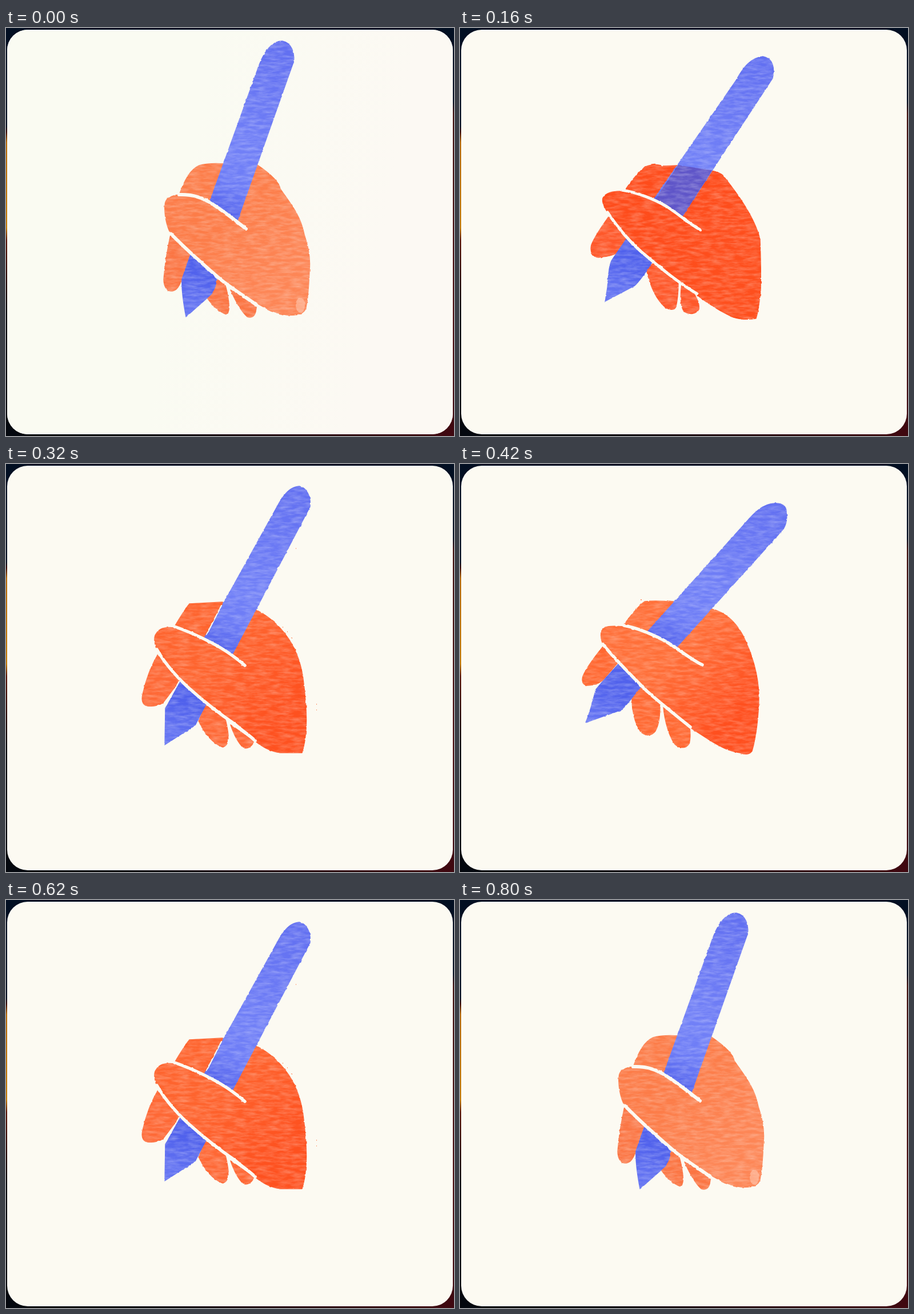
These frames come from a looping animation (784x715 px, 0.82 s). An HTML page:

```html
<!DOCTYPE html>
<html lang="en">
<head>
<meta charset="utf-8">
<title>Hand with pen</title>
<style>
  html, body { margin: 0; width: 100%; height: 100%; overflow: hidden; }
  body {
    position: relative;
    background:
      linear-gradient(#020f22 24%, #3a0805 25.5%, #b86a08 28%, #c47a06 49%, #5a1408 52%, #1c0406 64%, #04060c 70%) 0 0 / 3px 100% no-repeat,
      linear-gradient(#020f22 18%, #40100f 21%, #4a0e12 70%, #3c0810) 100% 0 / 3px 100% no-repeat,
      linear-gradient(90deg, #04080f 25%, #230812 60%, #400810) 0 100% / 100% 50% no-repeat,
      #020f22;
  }
  .card {
    position: absolute; left: 2px; top: 2.5px; width: 780px; height: 709.5px;
    border-radius: 36px; background: #fcfaf2; overflow: hidden;
  }
  .tint {
    position: absolute; inset: 0; opacity: 0;
    background: linear-gradient(100deg, #fafbf2 40%, #fcf9f3 80%);
    animation: tint 820ms linear infinite;
  }
  .strip {
    position: absolute; left: -2px; top: -2.5px; display: flex;
    animation: poses 820ms step-end infinite;
  }
  .strip svg { flex: none; display: block; }
  @keyframes tint { 0% { opacity: 1; } 14%, 100% { opacity: 0; } }
  /* four drawings in turn, held about 67 ms each */
  @keyframes poses {
    0%, 27.3%, 60.2%, 93.2%, 100% { transform: translateX(0); }
    2.6%, 35.6%, 68.5% { transform: translateX(-784px); }
    11%, 43.8%, 76.7% { transform: translateX(-1568px); }
    19%, 52%, 84.9% { transform: translateX(-2352px); }
  }
</style>
</head>
<body>
<div class="card">
  <div class="tint"></div>
  <div class="strip"></div>
</div>
<script>
const PAPER = '#fcfaf2';

// up and low are the pale lines along the thumb; tip joins them on the left
const poses = [
  {
    hand: ['#fc7c48', '#fd8656'], finger: '#fb7543', line: 6,
    back: 'M304 290C312 268 322 248 338 241C350 237 370 237 385 238L440 240C462 255 478 270 480 282C500 310 516 330 522 362C530 385 533 405 531 425C530 450 528 480 524 493C520 502 508 504 492 503C470 500 452 490 438 482Z',
    up: 'M303 292C325 291 345 297 362 309C385 324 400 336 420 352',
    low: 'M438 485C420 472 396 457 376 441C347 416 312 385 288 360',
    tip: 'C280 345 277 325 278 310C279 300 284 295 303 292Z',
    fingers: 'M288 362C283 385 278 415 276 440C276 455 283 462 291 461C299 460 303 452 307 443L322 396Z M372 438L352 473C362 487 375 498 386 502C391 499 391 485 389 475C388 465 386 458 383 448Z M393 459C400 475 410 495 422 506C430 509 435 505 437 497L439 485Z',
    pen: 'M443 65C455 32 472 22 484 23C500 26 506 45 503 60L368 442C368 455 360 466 350 475L315 506C311 485 307 460 308 440L322 400Z',
    extra: '<ellipse cx="515" cy="486" rx="8" ry="13" fill="#ffc4aa" opacity=".6"/>'
  },
  {
    hand: ['#fe642e', '#fe511f'], finger: '#fe6835', line: 5.5,
    back: 'M296 283C305 268 313 255 321 245L378 242L438 256C462 268 480 285 495 307C510 330 518 355 521 385C524 410 527 440 525 465C524 480 521 497 518 506L480 506C460 503 448 495 435 485Z',
    up: 'M295 285C330 297 365 315 385 328C400 338 410 346 418 353',
    low: 'M436 485C427 476 414 468 402 457C377 440 347 417 317 390C297 371 277 348 264 325',
    tip: 'C259 312 258 303 263 297C268 289 276 285 295 287Z',
    fingers: 'M266 333C255 352 245 378 240 400C236 414 239 422 247 424C258 425 268 424 275 418C285 405 295 392 306 376Z M352 416L337 450C347 472 362 490 379 496C388 494 389 485 389 475C388 465 386 455 383 444Z M393 457C398 472 406 488 415 497C422 500 430 496 434 486Z',
    pen: 'M478 68C490 48 500 40 513 39C525 41 534 55 532 75L338 444L331 458L278 492L279 428Z',
    gap: 'M377 248L351 299M303 381L280 423',
    extra: '<path d="M484 286h1M492 294h1M500 305h1M543 421h1M543 431h1M507 148h1" stroke="#fe9a70" stroke-width="2"/>'
  },
  {
    hand: ['#ff6f38', '#ff4f1e'], finger: '#ff6831', line: 5.5,
    back: 'M287 281C298 267 310 250 323 241C340 239 358 240 374 242L440 254C465 260 483 278 495 300C515 340 522 375 523 405C523 440 518 480 511 503C506 510 497 509 490 506C470 503 455 495 440 486L403 462Z',
    up: 'M287 283C310 287 335 298 355 308C385 325 400 340 424 352',
    low: 'M403 461C377 440 352 420 327 398C302 373 272 343 250 316',
    tip: 'C246 305 245 298 248 292C253 284 262 283 287 285Z',
    fingers: 'M251 319C238 335 222 355 215 372C212 383 216 388 225 388C234 388 241 386 250 379L278 346Z M301 408C300 430 306 455 316 469C325 478 336 476 342 468C349 455 350 440 350 419L315 389Z M356 426C358 450 366 478 376 491C384 499 396 499 401 490C404 480 403 470 402 461Z',
    pen: 'M498 105C515 85 530 70 550 69C562 68 572 73 571 85C573 95 571 105 566 114L315 392C305 403 295 420 282 431L220 453C230 430 233 410 238 395L248 383Z',
    extra: '<path d="M316 238h2" stroke="#fe9a70" stroke-width="2"/>'
  },
  {
    hand: ['#fe4c1b', '#fe4f1d'], finger: '#fe582a', line: 5,
    back: 'M291 281C300 268 312 252 325 243C335 239 345 238 355 242L382 241L440 250C450 252 459 255 463 262C485 290 515 330 525 370C526 400 527 430 526 460C524 480 521 500 518 509C500 512 480 510 470 503C450 493 430 480 413 467Z',
    up: 'M283 284C310 288 340 300 362 313C385 328 400 342 421 354',
    low: 'M415 466C377 443 347 417 317 392C292 370 274 347 258 323',
    tip: 'C252 312 248 305 250 298C255 289 265 286 283 286Z',
    fingers: 'M260 331C250 345 236 365 230 380C227 392 232 402 243 402C258 401 270 398 280 392L297 370Z M326 422C332 450 342 475 360 490C370 495 376 494 378 488C381 475 382 462 382 446L340 411Z M388 448C385 470 386 488 392 497C402 503 414 501 418 493C420 482 413 472 408 462Z',
    pen: 'M483 92C495 70 508 52 530 50C548 53 551 70 547 88L335 412C325 428 315 443 305 452L254 479L258 455C260 435 260 415 267 405Z',
    shade: 'M382 241L440 250L390 328L342 301Z'
  }
];

const stops = list => list.map(([at, c]) => `<stop offset="${at}" stop-color="${c}"/>`).join('');
const fill = (d, paint) => d ? `<path d="${d}" fill="${paint}" stroke="${paint}" stroke-width="1.4" stroke-linejoin="round"/>` : '';
const line = (d, w) => d ? `<path d="${d}" fill="none" stroke="${PAPER}" stroke-width="${w}" stroke-linecap="round"/>` : '';

function draw(p, i) {
  const hand = `url(#hand${i})`, pen = `url(#pen${i})`;
  const thumb = p.up + p.low.replace('M', 'L') + p.tip;
  return `<svg width="784" height="715" viewBox="0 0 784 715">
    <defs>
      <linearGradient id="hand${i}" gradientUnits="userSpaceOnUse" x1="300" y1="280" x2="470" y2="450">
        ${stops([[0, p.hand[0]], [.35, p.hand[0]], [1, p.hand[1]]])}
      </linearGradient>
      <linearGradient id="pen${i}" gradientUnits="userSpaceOnUse" x1="500" y1="50" x2="290" y2="470">
        ${stops([[0, '#6270f1'], [.4, '#7180f7'], [.53, '#6d7cf6'], [.64, '#5363ec'], [.88, '#5061ec'], [1, '#6272f2']])}
      </linearGradient>
      <filter id="crayon${i}" filterUnits="userSpaceOnUse" x="180" y="0" width="420" height="540" color-interpolation-filters="sRGB">
        <feTurbulence type="fractalNoise" baseFrequency=".14" numOctaves="2" seed="${i + 20}" result="grit"/>
        <feDisplacementMap in="SourceGraphic" in2="grit" scale="2.5" xChannelSelector="R" yChannelSelector="G" result="rough"/>
        <feTurbulence type="fractalNoise" baseFrequency=".05 .2" numOctaves="4" seed="${i + 5}"/>
        <feColorMatrix values="0 0 0 0 1  0 0 0 0 1  0 0 0 0 1  .5 0 0 0 -.17"/>
        <feComposite in2="rough" operator="in" result="streaks"/>
        <feMerge><feMergeNode in="rough"/><feMergeNode in="streaks"/></feMerge>
        <feGaussianBlur stdDeviation=".7"/>
      </filter>
    </defs>
    <g filter="url(#crayon${i})">
      ${fill(p.fingers, p.finger)}${fill(p.back, hand)}
      ${fill(p.pen, pen)}${fill(p.shade, '#5f55c8')}${line(p.gap, 2)}
      ${fill(thumb, hand)}${line(p.up + p.low, p.line)}${p.extra || ''}
    </g>
  </svg>`;
}

document.querySelector('.strip').innerHTML = poses.map(draw).join('');
</script>
</body>
</html>
```
